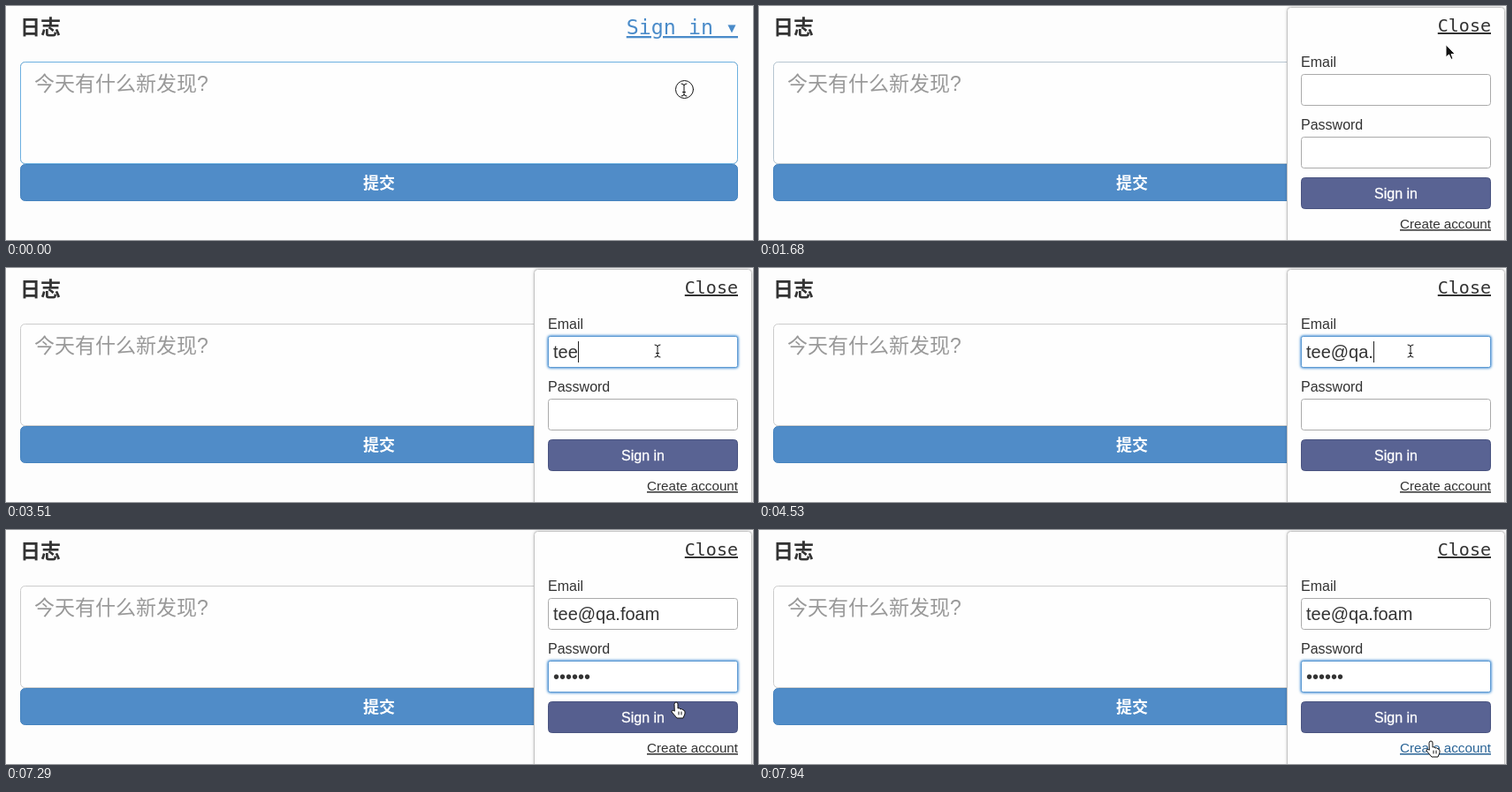
Recreate the animation shown at these times as an HTML page. Size 845 px wide and 265 px high, loop 8 s.

```html
<!DOCTYPE html>
<html lang="zh">
<head>
<meta charset="utf-8">
<title>日志</title>
<style>
  html, body { margin: 0; width: 100%; height: 100%; overflow: hidden; background: #fdfdfd; }
  svg { display: block; width: 845px; height: 265px; }
  text { font: 16px "Liberation Sans", Arial, sans-serif; fill: #333; white-space: pre; }
  .cjk { font-family: "Liberation Sans", "Noto Sans CJK SC", "Noto Sans CJK", sans-serif; }
  .mono { font-family: "DejaVu Sans Mono", monospace; }
  .link { text-anchor: end; text-decoration: underline; text-decoration-skip-ink: none; }
  .link.hover { fill: #2a6496; }
  #signIn { font-size: 23.3px; }
  #signIn:not(.hover) { fill: #4a8bc9; }
  .value { font-size: 20px; }
  .field { fill: #fff; stroke: #aaa; }
  .glow { fill: #fff; stroke: #5f9bd3; filter: drop-shadow(0 0 1.5px #5b9ddb) drop-shadow(0 0 1px #6aa5dc); }
  #submit { fill: #596393; stroke: #4a5480; }
  #submit.hover { fill: #565f8f; }
  .icon { stroke-linejoin: round; stroke-linecap: round; }
</style>
</head>
<body>
<svg viewBox="0 0 845 265">
  <text class="cjk" x="16" y="32" style="font-size:23px;font-weight:bold">日志</text>
  <text class="link mono" id="signIn" x="828" y="32">Sign in ▾</text>

  <rect x="16.5" y="63.5" width="811" height="115" rx="5" fill="#fefefe" stroke="#ccc"/>
  <rect id="noteFocus" x="16.5" y="63.5" width="811" height="115" rx="5" fill="none" stroke="#6cb0e0"/>
  <text class="cjk" x="32" y="96" style="font-size:23px;fill:#999">今天有什么新发现?</text>
  <rect x="16.5" y="179.5" width="811" height="41" rx="5" fill="#508cc8" stroke="#4583be"/>
  <text class="cjk" x="422" y="207" text-anchor="middle" style="font-size:18px;font-weight:bold;fill:#fff">提交</text>

  <g id="popup">
    <rect x="597.5" y="1.5" width="246" height="290" rx="4" fill="#fefefe" stroke="#c4c4c4"
          style="filter:drop-shadow(0 0 1.5px rgba(0,0,0,.2))"/>
    <text class="link mono" id="close" x="828" y="29" style="font-size:20px">Close</text>
    <text x="613" y="69">Email</text>
    <rect class="field" x="613.5" y="77.5" width="214" height="35" rx="3"/>
    <rect class="glow" id="emailFocus" x="613.5" y="77.5" width="214" height="35" rx="2"/>
    <text class="value" id="email" x="619" y="102"></text>
    <text x="613" y="140">Password</text>
    <rect class="field" x="613.5" y="148.5" width="214" height="35" rx="3"/>
    <rect class="glow" id="passwordFocus" x="613.5" y="148.5" width="214" height="35" rx="2"/>
    <text class="value" id="password" x="619" y="173"></text>
    <rect id="submit" x="613.5" y="194.5" width="214" height="35" rx="4"/>
    <text x="720.5" y="218" text-anchor="middle" style="fill:#fff;stroke:#fff;stroke-width:.3">Sign in</text>
    <text class="link" id="create" x="828" y="252" style="font-size:15.2px">Create account</text>
  </g>

  <rect id="caret" width="1" fill="#222"/>
  <g id="mouse" class="icon">
    <circle id="ring" cx=".5" cy="-.5" r="10" fill="#fff" fill-opacity=".6" stroke="#111"/>
    <path id="beam" fill="none" stroke="#111"
          d="M-3-7Q0-7 0-5Q0-7 3-7M0-5V5M-3 7Q0 7 0 5Q0 7 3 7M-1.5 2.5H1.500"/>
    <path id="hand" fill="#fff" stroke="#111"
          d="M-2 1Q-2-1 0-1Q2-1 2 1V6Q4 5 5 7Q7 6 8 8Q10 8 10 10V12L8 17H1L-5 10Q-5 7-2 9ZM3 10V13M6 10V13"/>
    <path id="arrow" fill="#111" stroke="#fff" d="M0 0V14L3.500 11L6 16.500L8 15.500L6 10.500H10Z"/>
  </g>
</svg>
<script>
const LOOP = 8000, BLINK = 480;
const POPUP_AT = 1510, EMAIL_AT = 2320, PASSWORD_AT = 5470;
const EMAIL = "tee@qa.foam";
const emailKeys = [3280, 3400, 3510, 3930, 4170, 4350, 4530, 4820, 4940, 5110, 5170];
const passwordKeys = [5820, 6000, 6170, 6270, 6360, 6460];
const clicks = [0, 1450, EMAIL_AT];

// Pointer hotspot: time, x, y
const path = [
  [0, 767, 95], [660, 767, 95], [1170, 787, 29], [1510, 788, 30],
  [2080, 736.5, 94], [6945, 736.5, 94], [7290, 758, 196], [7500, 759, 206],
  [7770, 760, 236], [7940, 760, 240], [LOOP, 760, 240]
];

const el = {};
document.querySelectorAll("[id]").forEach(node => el[node.id] = node);

const show = (node, on) => node.style.display = on ? "" : "none";
const between = (t, from, to) => t >= from && t < to;
const typed = (keys, t) => keys.filter(key => key <= t).length;

function pointerAt(t) {
  const i = Math.max(1, path.findIndex(point => point[0] > t));
  const [t0, x0, y0] = path[i - 1], [t1, x1, y1] = path[i];
  const u = (t - t0) / (t1 - t0), e = u * u * (3 - 2 * u);
  return [x0 + (x1 - x0) * e, y0 + (y1 - y0) * e];
}

function drawPointer(t, open) {
  const [x, y] = pointerAt(t);
  const inside = (left, top, right, bottom) => between(x, left, right) && between(y, top, bottom);
  const hovers = {
    signIn: !open && inside(702, 11, 828, 37),
    close: open && inside(768, 10, 828, 34),
    submit: open && inside(613, 194, 828, 230),
    create: open && inside(725, 238, 828, 256)
  };
  for (const id in hovers) el[id].classList.toggle("hover", hovers[id]);

  const hand = Object.values(hovers).some(Boolean);
  const beam = open ? inside(613, 77, 828, 113) || inside(613, 148, 828, 184)
                    : inside(16, 63, 828, 179);
  show(el.hand, hand);
  show(el.beam, beam);
  show(el.arrow, !hand && !beam);
  show(el.ring, clicks.some(at => between(t, at, at + 60)));
  el.mouse.setAttribute("transform", `translate(${Math.round(x)} ${Math.round(y)})`);
}

function drawCaret(t) {
  let x = 32, y = 72, height = 32, resets = [-550];
  if (t >= EMAIL_AT) {
    const inPassword = t >= PASSWORD_AT;
    const field = inPassword ? el.password : el.email;
    x = 619 + Math.round(field.getComputedTextLength());
    y = inPassword ? 154 : 83;
    height = 24;
    resets = inPassword ? [PASSWORD_AT, ...passwordKeys, 6500] : [EMAIL_AT, ...emailKeys];
  }
  const since = t - resets.filter(at => at <= t).pop();
  show(el.caret, !between(t, POPUP_AT, EMAIL_AT) && since % (2 * BLINK) < BLINK);
  el.caret.setAttribute("x", x);
  el.caret.setAttribute("y", y);
  el.caret.setAttribute("height", height);
}

function draw(t) {
  const open = t >= POPUP_AT;
  show(el.popup, open);
  el.noteFocus.style.opacity = Math.min(1, Math.max(0, 1 - (t - POPUP_AT) / 220));
  show(el.emailFocus, between(t, EMAIL_AT, PASSWORD_AT));
  show(el.passwordFocus, t >= PASSWORD_AT);
  el.email.textContent = EMAIL.slice(0, typed(emailKeys, t));
  el.password.textContent = "•".repeat(typed(passwordKeys, t));
  drawCaret(t);
  drawPointer(t, open);
}

const start = performance.now();
function tick() {
  draw((performance.now() - start) % LOOP);
  requestAnimationFrame(tick);
}
tick();
</script>
</body>
</html>
```
